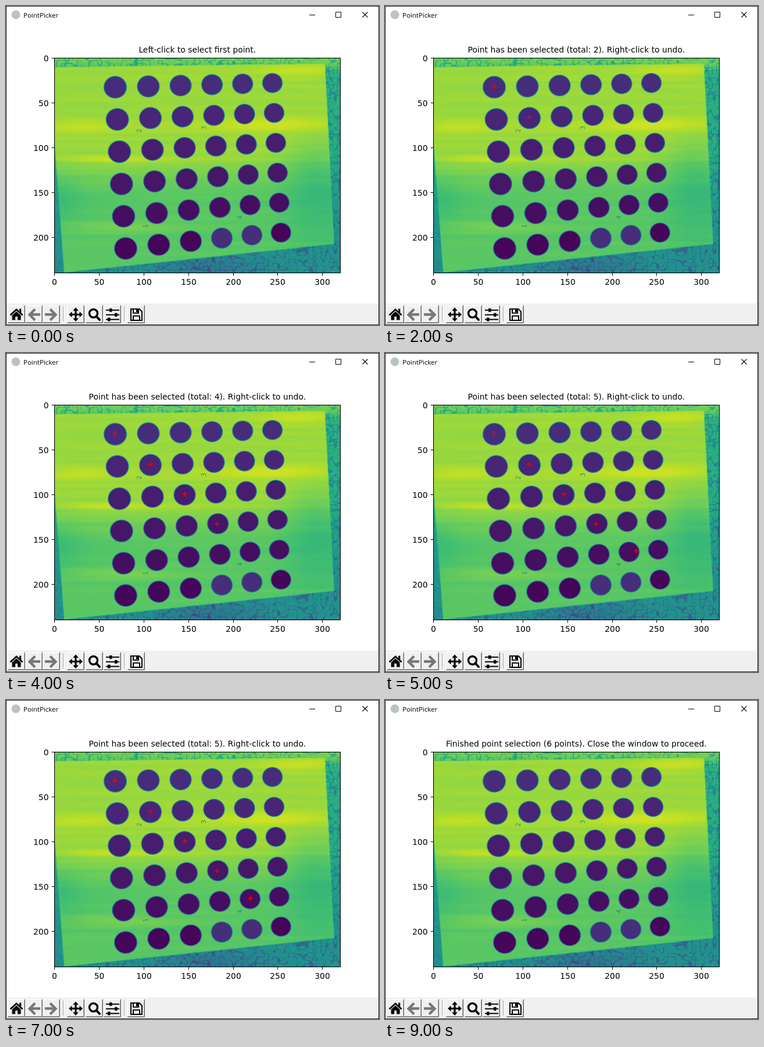
Recreate the animation shown at these times as an HTML page with a canvas. Size 642 by 548 pixels, loop 10000 ms.

```html
<!DOCTYPE html>
<html lang="en">
<head>
<meta charset="utf-8">
<title>PointPicker</title>
<style>
  html, body { margin: 0; width: 100%; height: 100%; overflow: hidden; background: #fff; }
  canvas, svg { position: absolute; left: 0; top: 0; }
  canvas { left: 83px; top: 89px; }
  .plot { font: 13.89px "DejaVu Sans", sans-serif; }
  .ink { fill: none; stroke: #000; }
  .digit { font: 10px "DejaVu Sans", sans-serif; fill: #1f8a8c; text-anchor: middle; }
</style>
</head>
<body>
<canvas id="photo" width="492" height="369"></canvas>
<svg width="642" height="548" viewBox="0 0 642 548">
  <defs>
    <pattern id="stipple" width="2" height="2" patternUnits="userSpaceOnUse">
      <path d="M0 0h1v1h-1zM1 1h1v1h-1z" shape-rendering="crispEdges"/>
    </pattern>
  </defs>

  <!-- title bar -->
  <circle cx="17" cy="15" r="7.5" fill="#b9c3c6"/>
  <text x="30" y="20" font-family="'Open Sans', sans-serif" font-size="11.5">PointPicker</text>
  <path class="ink" d="M522 15.5h10M567.5 10.5h9v9h-9z"/>
  <path class="ink" d="M613.5 10.5l9 9m0-9l-9 9" stroke-width="1.1"/>

  <!-- plot -->
  <g id="digits"></g>
  <g id="markers" stroke="#f00" stroke-width="1.4"></g>
  <rect class="ink" x="83.5" y="89.5" width="492" height="369" stroke-width="1.1"/>
  <g id="axes" class="plot"></g>
  <text id="message" class="plot" x="329.3" y="80" text-anchor="middle"></text>

  <!-- toolbar -->
  <rect x="0" y="511" width="642" height="37" fill="#f0f0f0"/>
  <g id="buttons" fill="none"></g>
  <path d="M98.5 516v26M203.5 516v26" stroke="#a0a0a0"/>
  <path d="M99.5 516v26M204.5 516v26" stroke="#fff"/>
  <path d="M7.5 531L18 521.5 28.500 531" fill="none" stroke="#000" stroke-width="2.800"/>
  <path d="M23 520h3.200v7l-3.200-3zM10.500 531.500l7.500-6.700 7.500 6.700v8h-5.500v-6h-4v6h-5.500z"/>
  <g fill="url(#stipple)">
    <path id="arrow" d="M37.500 530l11-11 3 3-5.500 5.800h13v4.400h-13l5.500 5.800-3 3z"/>
    <use href="#arrow" transform="matrix(-1 0 0 1 126 0)"/>
  </g>
  <path class="ink" d="M120 521v18M111 530h18" stroke-width="3.200"/>
  <path d="M120 518l5 5.500h-10zM120 542l5-5.500h-10zM108 530l5.500-5v10zM132 530l-5.500-5v10z"/>
  <circle class="ink" cx="150.500" cy="528" r="7" stroke-width="3.400"/>
  <path class="ink" d="M155.500 533l5.500 6" stroke-width="4" stroke-linecap="round"/>
  <path class="ink" d="M172 522.500h23M172 530.500h23M172 538.500h23" stroke-width="2"/>
  <path d="M178 519.500h4.500v6H178zM187 527.500h4.500v6H187zM175 535.500h4.500v6H175z"/>
  <path class="ink" d="M215 520.500h14.500l4.500 4.500v15h-19zM219 540v-7.500h11v7.500M219 521v6.500h9V521" stroke-width="2"/>
  <path d="M224 521h3v5h-3z"/>
  <rect x=".5" y=".5" width="641" height="547" class="ink" style="stroke:#2a2a2c"/>
</svg>
<script>
const byId = id => document.getElementById(id);
const clamp = v => Math.min(1, Math.max(0, v));
const smooth = v => { v = clamp(v); return v * v * (3 - 2 * v); };
const mix = (a, b, k) => a + (b - a) * k;

// Viridis, one colour per tenth
const viridis = ['440154', '482475', '414487', '355f8d', '2a788e', '21918c',
  '22a884', '44bf70', '7ad151', 'bddf26', 'fde725']
  .map(hex => [0, 2, 4].map(i => parseInt(hex.slice(i, i + 2), 16)));
function colour(v) {
  const s = clamp(v) * 10, i = Math.min(9, Math.floor(s));
  return viridis[i].map((c, k) => mix(c, viridis[i + 1][k], s - i));
}

function hash(x, y) {
  const s = Math.sin(x * 127.1 + y * 311.7) * 43758.5453;
  return s - Math.floor(s);
}
function noise(x, y) {
  const i = Math.floor(x), j = Math.floor(y), u = smooth(x - i), w = smooth(y - j);
  return mix(mix(hash(i, j), hash(i + 1, j), u), mix(hash(i, j + 1), hash(i + 1, j + 1), u), w);
}

// Light and shade on the paper: x, y, width, height, strength
const patches = [
  [500, 110, 70, 13, .06], [470, 203, 110, 13, .07], [130, 207, 60, 11, .05],
  [300, 205, 200, 8, .03], [180, 265, 80, 7, .05], [300, 262, 200, 6, .03],
  [190, 380, 100, 9, .06], [540, 330, 60, 80, -.07], [90, 330, 40, 45, -.05],
  [530, 270, 50, 40, -.04]
];
function paper(x, y) {
  let v = .85 - .11 * smooth((y - 240) / 90) + .03 * (noise(x / 150, y / 6) - .5);
  for (const [px, py, w, h, a] of patches)
    v += a * Math.exp(-(((x - px) / w) ** 2) - ((y - py) / h) ** 2);
  return v;
}
function table(x, y) {
  let v = mix(.78, .62, smooth((y - 92) / 30));
  v = mix(v, .5, smooth((y - 220) / 200));
  v -= .1 * Math.exp(-(((x - 350) / 80) ** 2) - ((y - 450) / 25) ** 2);
  const vein = Math.abs(noise(x / 7, y / 6) - .5);
  return v + .05 * (noise(x / 3, y / 3) - .5) - .2 * Math.max(0, 1 - vein * 9) * (x < 110 && y > 105 ? .3 : 1);
}
// Distance inside the sheet's four edges
const sheet = (x, y) => Math.min(
  y - 105 + (x - 83) * .0129, 549 + (y - 99) * .0516 - x,
  458 - (x - 100) * .1054 - y, x - 83 - (y - 230) * .0746);

const dots = [];
for (let r = 0; r < 6; r++) for (let c = 0; c < 6; c++) dots.push({
  x: 188 + 3.6 * r + 57.7 * c - (.72 + .026 * r) * c * c,
  y: 139.5 - 1.45 * c + r * (55.4 - 1.05 * c + .05 * c * c),
  radius: 19.4 - .46 * c,
  value: r === 5 && (c === 3 || c === 4) ? .13 : .125 - .022 * r
});

function paintPhoto() {
  const ctx = byId('photo').getContext('2d'), image = ctx.createImageData(492, 369);
  for (let j = 0, p = 0; j < 369; j++) for (let i = 0; i < 492; i++, p += 4) {
    const x = i + 83.5, y = j + 89.5;
    let v = mix(table(x, y), paper(x, y), smooth(sheet(x, y) / 3 + .5));
    for (const d of dots) {
      if (Math.abs(x - d.x) > 23 || Math.abs(y - d.y) > 23) continue;
      const gap = d.radius - Math.hypot(x - d.x, (y - d.y) * 1.03);
      v = mix(v, d.value, smooth(gap / 3 + .5));
    }
    image.data.set([...colour(v), 255], p);
  }
  ctx.putImageData(image, 0, 0);
}

function buildChrome() {
  let axes = '';
  for (let n = 0; n <= 300; n += 50) {
    const x = 83.5 + Math.round(n * 1.5375), y = x + 6;
    axes += `<path class="ink" d="M${x} 459v4.500"/><text x="${x}" y="479" text-anchor="middle">${n}</text>`;
    if (n <= 200)
      axes += `<path class="ink" d="M78.500 ${y}h5"/><text x="73.500" y="${y + 5}" text-anchor="end">${n}</text>`;
  }
  byId('axes').innerHTML = axes;
  byId('digits').innerHTML = [[2, 229, 214], [3, 340, 209], [1, 240, 378], [4, 402, 363]]
    .map(([n, x, y]) => `<text class="digit" transform="translate(${x + 4} ${y}) rotate(-90)">${n}</text>`).join('');
  byId('buttons').innerHTML = [3, 33, 63, 105, 137, 168, 209].map(x =>
    `<path stroke="#fff" d="M${x + .5} 544v-29.500h29"/>
     <path stroke="#a0a0a0" d="M${x + 1} 543.500h27.500v-28"/>
     <path stroke="#696969" d="M${x} 544.500h29.500v-30.500"/>`).join('');
}

const picks = [[187.5, 138.5], [248.5, 191.5], [307.5, 242.5], [363.5, 293.5], [420.5, 341], [472.5, 388.5]];
const missed = [432.5, 340];
const counts = [0, 1, 2, 3, 4, 5, 4, 5, 6, 0];
const messages = {
  0: 'Left-click to select first point.',
  6: 'Removed previously selected point. Select another point.',
  9: 'Finished point selection (6 points). Close the window to proceed.'
};
let shown = -1;
function draw(now) {
  const second = Math.floor(now / 1000) % 10;
  if (second !== shown) {
    shown = second;
    const count = counts[second];
    byId('message').textContent = messages[second] ||
      `Point has been selected (total: ${count}). Right-click to undo.`;
    byId('markers').innerHTML = picks.slice(0, count).map((pick, i) => {
      const [x, y] = second === 5 && i === 4 ? missed : pick;
      return `<path d="M${x - 4} ${y}h8M${x} ${y - 4}v8"/>`;
    }).join('');
  }
  requestAnimationFrame(draw);
}

paintPhoto();
buildChrome();
draw(performance.now());
</script>
</body>
</html>
```
